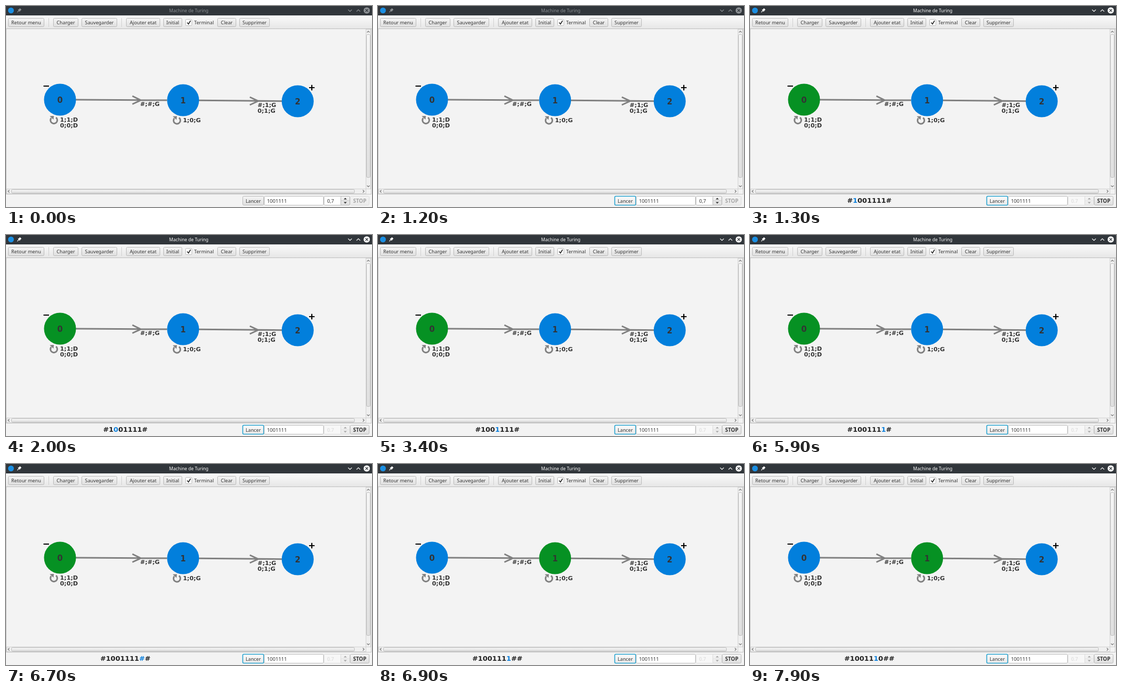
Write an HTML page that moves like this. It is 698 by 384 pixels and loops after 8 s.

```html
<!DOCTYPE html>
<html lang="fr">
<head>
<meta charset="utf-8">
<title>Machine de Turing</title>
<style>
  html, body { margin: 0; width: 100%; height: 100%; overflow: hidden; background: #f3f3f3; }
  svg { display: block; width: 698px; height: 384px; }
  text { font: 9.2px "Noto Sans", sans-serif; fill: #333; }
  .mid { text-anchor: middle; }
  .label { font: bold 11.3px "DejaVu Sans", sans-serif; }
  .state { font: bold 15px "DejaVu Sans", sans-serif; }
  #tape { font: bold 13px "DejaVu Sans", sans-serif; fill: #222; }
  .head { fill: #0a7fdc; }
  .line { fill: none; stroke: #808080; stroke-width: 3; }
  .sign { fill: none; stroke: #000; stroke-width: 2.2; }
  .box { fill: url(#face); stroke: #b9b9b9; }
  .field { fill: #fff; stroke: #b9b9b9; }
  .bar { fill: #efefef; stroke: #d2d2d2; }
  .thumb { fill: url(#face); stroke: #bcbcbc; }
  .chevron { fill: none; stroke: #777; stroke-width: 1.2; }
  #chrome { color: #8d9195; }
  #chrome.active { color: #fcfcfc; }
  #chrome text { font-size: 8.6px; fill: currentColor; }
  #chrome path { fill: none; stroke: currentColor; stroke-width: 1.1; }
</style>
</head>
<body>
<svg viewBox="0 0 698 384">
  <defs>
    <linearGradient id="face" x2="0" y2="1"><stop stop-color="#f5f5f5"/><stop offset="1" stop-color="#dfdfdf"/></linearGradient>
    <linearGradient id="hover" x2="0" y2="1"><stop stop-color="#fbfbfb"/><stop offset="1" stop-color="#e9e9e9"/></linearGradient>
    <linearGradient id="strip" x2="0" y2="1"><stop stop-color="#fafafa"/><stop offset="1" stop-color="#e6e6e6"/></linearGradient>
  </defs>

  <rect width="698" height="18" fill="#31363b"/>
  <circle cx="9.5" cy="8.5" r="5.5" fill="#1b8fe3"/>
  <g id="chrome">
    <text class="mid" x="348.5" y="12">Machine de Turing</text>
    <path d="M21.5 12l3-3"/>
    <path d="M23 7l3.500 3.500M24.200 7.500l2.500-2.500 2 2-2.500 2.500z" style="fill:currentColor"/>
    <path d="M652.500 7l3.500 3.500 3.500-3.500M668.500 10.500l3.500-3.500 3.500 3.500"/>
    <circle cx="688" cy="8.500" r="6" fill="currentColor"/>
    <path d="M685.500 6l5 5m0-5l-5 5" style="stroke:#31363b"/>
  </g>

  <rect y="18" width="698" height="26" fill="url(#strip)"/>
  <path d="M0 43.500H698" stroke="#bdbdbd"/>
  <path d="M81.500 23v17M220.500 23v17" stroke="#d0d0d0"/>
  <g id="toolbar"></g>
  <rect class="field" x="342.500" y="25.500" width="12" height="12" rx="2"/>
  <path d="M345.500 31.500l2.500 3 4-6.500" fill="none" stroke="#333" stroke-width="1.800"/>
  <text x="358.700" y="34.500">Terminal</text>

  <path d="M.5 44V359.500H697M696.500 44V359" fill="none" stroke="#c4c4c4"/>
  <rect class="bar" x="1.500" y="349.500" width="685" height="9"/>
  <rect class="thumb" x="10.500" y="350.500" width="654" height="7" rx="2"/>
  <rect class="bar" x="686.500" y="44.500" width="9" height="305"/>
  <rect class="thumb" x="687.500" y="54.500" width="7" height="273" rx="2"/>
  <path class="chevron" d="M6.500 351.500l-2.500 2.500 2.500 2.500M680.500 351.500l2.500 2.500-2.500 2.500M688.500 50.500l2.500-2.500 2.500 2.500M688.500 343l2.500 2.500 2.500-2.500"/>

  <path class="line" d="M133 179L307 180M241 172l16 8-16 7.500M368 180.300L526 181.700M465 174l16 7.600-16 7.400"/>
  <g id="states"></g>
  <path class="sign" d="M71.500 153h10.500M578 156h10.500M583.200 150.800v10.500"/>
  <g id="loops"></g>
  <g id="labels"></g>

  <text id="tape" class="mid" x="227.700" y="376"></text>
  <g id="launch"></g>
  <rect class="field" x="492.500" y="363.500" width="113" height="17" rx="2"/>
  <text x="497.700" y="375.800" style="font-size:9.500px">1001111</text>
  <g id="spinner">
    <rect class="field" x="606.500" y="363.500" width="49" height="17" rx="2"/>
    <rect class="box" x="638.500" y="363.500" width="17" height="17" rx="2"/>
    <path d="M638.500 372h17" stroke="#c4c4c4"/>
    <path d="M644 369.500l3-3 3 3zM644 374.500l3 3 3-3z" fill="#333"/>
    <text id="speed" x="612.500" y="375.800"></text>
  </g>
  <g id="stop">
    <rect class="box" x="656.500" y="363.500" width="36" height="17" rx="2"/>
    <text class="mid" x="674.700" y="375.800" style="font-weight:bold;font-size:10px">STOP</text>
  </g>
</svg>
<script>
const $ = id => document.getElementById(id);
const BLUE = '#027fdc', GREEN = '#069123';
const LOOP = 8000, HOVER = 700, FOCUS = 1200, START = 1300, STEP = 700;

const button = (x, y, w, h, label) =>
  `<rect class="box" x="${x}" y="${y}" width="${w}" height="${h}" rx="2"/>
   <text class="mid" x="${x + w / 2}" y="${y + h / 2 + 3.5}">${label}</text>`;

$('toolbar').innerHTML = [
  [4.5, 68, 'Retour menu'], [90.5, 47, 'Charger'], [144.5, 67, 'Sauvegarder'],
  [229.5, 64, 'Ajouter etat'], [300.5, 35, 'Initial'], [403.5, 35, 'Clear'], [445.5, 57, 'Supprimer']
].map(([x, w, label]) => button(x, 23.5, w, 16, label)).join('');

$('launch').innerHTML = button(451.5, 363.5, 40, 17, 'Lancer');
const launchBox = $('launch').firstElementChild;

$('states').innerHTML = [[103, 179], [337.7, 180], [556.3, 182]].map(([x, y], i) =>
  `<circle cx="${x}" cy="${y}" r="30.5"/><text class="state mid" x="${x}" y="${y + 6}">${i}</text>`).join('');
const circles = $('states').querySelectorAll('circle');

$('loops').innerHTML = [[91.3, 218], [326, 218.5]].map(([x, y]) =>
  `<g transform="translate(${x} ${y})"><path class="line" d="M4 -5A6.500 6.500 0 1 1 -5 -4"/>
   <path d="M-8 -7.800L0 -8L-.8 -1z" fill="#808080"/></g>`).join('');

$('labels').innerHTML = [
  [103, 220.5, '1;1;D'], [103, 231.8, '0;0;D'], [255.7, 190.8, '#;#;G'],
  [337.5, 221.8, '1;0;G'], [479.7, 192.5, '#;1;G'], [479.7, 203.8, '0;1;G']
].map(([x, y, label]) => `<text class="label" x="${x}" y="${y}">${label}</text>`).join('');

// state -> symbol read -> [symbol written, move, next state]
const RULES = [
  { 0: ['0', 1, 0], 1: ['1', 1, 0], '#': ['#', -1, 1] },
  { 1: ['0', -1, 1], '#': ['#', -1, 2], 0: ['1', -1, 2] }
];

function runMachine(steps) {
  const tape = [...'#1001111#'];
  let head = 1, state = 0;
  while (steps-- > 0) {
    const [symbol, move, next] = RULES[state][tape[head]];
    tape[head] = symbol;
    head += move;
    state = next;
    if (head === tape.length - 1) tape.push('#');
  }
  return { tape, head, state };
}

let shown;
function draw(t) {
  const running = t >= START;
  const step = running ? Math.floor((t - START) / STEP) : -1;
  const key = [step, t >= HOVER, t >= FOCUS].join();
  if (key === shown) return;
  shown = key;

  const { tape, head, state } = runMachine(step);
  $('chrome').setAttribute('class', running ? 'active' : '');
  $('tape').innerHTML = running
    ? tape.map((s, i) => i === head ? `<tspan class="head">${s}</tspan>` : s).join('') : '';
  circles.forEach((c, i) => c.setAttribute('fill', running && i === state ? GREEN : BLUE));

  launchBox.style.fill = t >= HOVER ? 'url(#hover)' : '';
  launchBox.style.stroke = t >= FOCUS ? '#27a3d0' : '';
  launchBox.style.strokeWidth = t >= FOCUS ? 1.6 : '';

  $('speed').textContent = running ? '0.7' : '0,7';
  $('speed').style.opacity = running ? 0.4 : 1;
  $('spinner').style.opacity = running ? 0.4 : 1;
  $('stop').style.opacity = running ? 1 : 0.4;
}

const origin = performance.now();
function frame() {
  draw((performance.now() - origin) % LOOP);
  requestAnimationFrame(frame);
}
frame();
</script>
</body>
</html>
```
